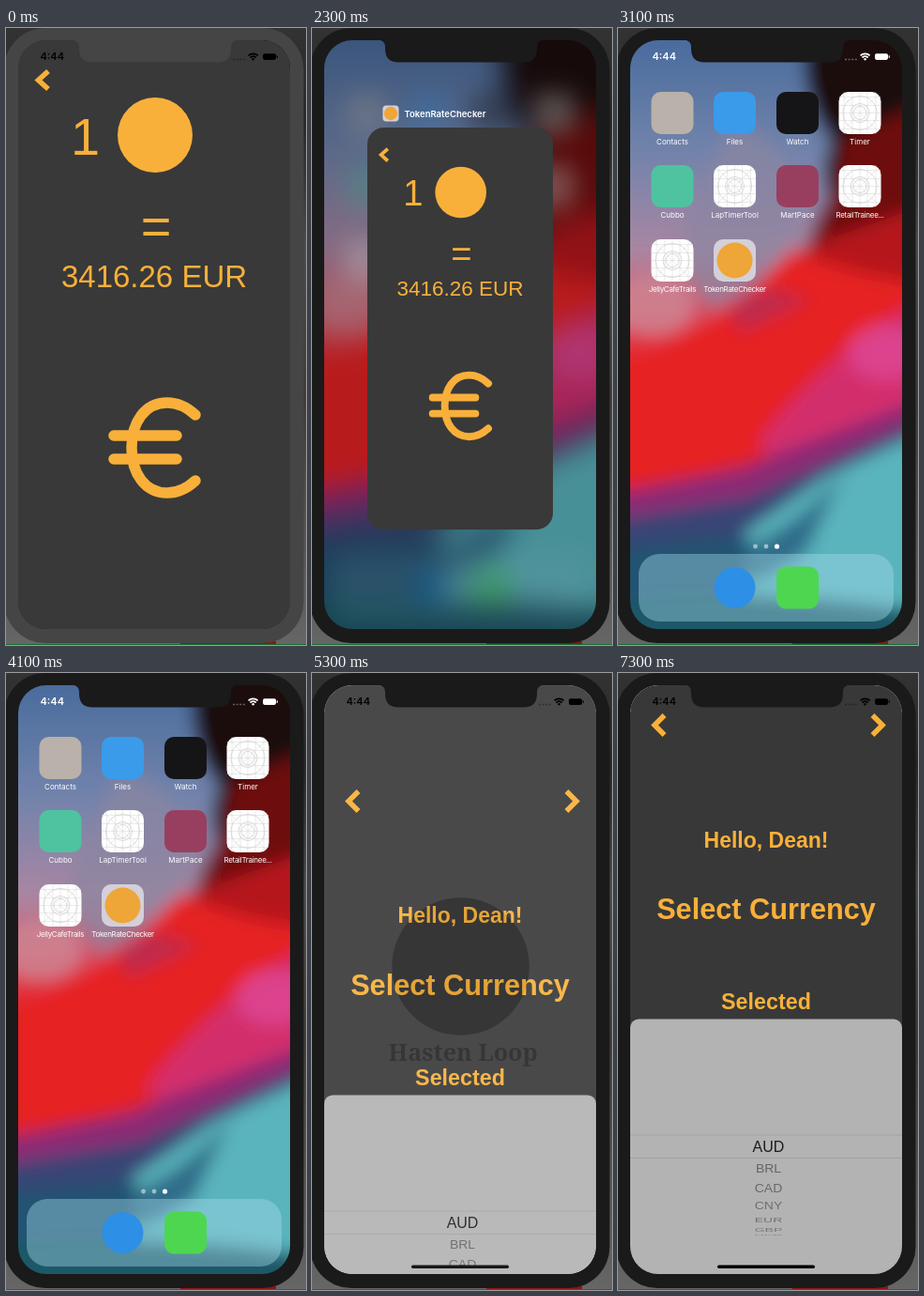
An HTML page that plays this animation: 320 by 657 pixels, repeating every 8 s.

```html
<!DOCTYPE html>
<html lang="en">
<meta charset="utf-8">
<title>Phone app switching</title>
<style>
  html, body { margin: 0; width: 100%; height: 100%; overflow: hidden; background: #222; }
  svg { display: block; width: 320px; height: 657px; }
  text { font-family: "Liberation Sans", Arial, sans-serif; }
  .ui { font-family: Inter, Roboto, sans-serif; }
  .mid { text-anchor: middle; }
  .gold { fill: #f8b03a; }
  .line { fill: none; stroke: #f8b03a; }
  .bold { font-weight: bold; }
</style>
<svg viewBox="0 0 320 657">
  <defs>
    <linearGradient id="desk" x2="0" y2="1">
      <stop stop-color="#333"/><stop offset=".15" stop-color="#262626"/>
      <stop offset=".35" stop-color="#4a4a4a"/><stop offset=".6" stop-color="#403a3a"/>
      <stop offset="1" stop-color="#666"/>
    </linearGradient>
    <linearGradient id="sky" x2="0" y2="1">
      <stop stop-color="#3b6398"/><stop offset=".22" stop-color="#7183ab"/>
      <stop offset=".37" stop-color="#ab86a2"/><stop offset=".46" stop-color="#d8485c"/>
      <stop offset=".54" stop-color="#e81f24"/><stop offset=".72" stop-color="#d01528"/>
      <stop offset=".8" stop-color="#5a2360"/><stop offset=".87" stop-color="#23486a"/>
      <stop offset="1" stop-color="#1f5568"/>
    </linearGradient>
    <filter id="soft" x="-20%" y="-20%" width="140%" height="140%"><feGaussianBlur stdDeviation="9"/></filter>
    <clipPath id="screen"><rect x="13" y="13" width="290" height="627" rx="30"/></clipPath>
    <clipPath id="appClip"><rect id="appBox"/></clipPath>
    <clipPath id="launchClip"><rect id="launchBox"/></clipPath>
    <g id="status" fill="currentColor">
      <text class="ui" x="36.5" y="34.2" font-size="11" font-weight="600">4:44</text>
      <path d="M258.6 29.4a7 7 0 0 1 10 0M260.5 31.5a4.4 4.4 0 0 1 6.2 0" fill="none" stroke="currentColor" stroke-width="1.8"/>
      <circle cx="263.6" cy="33.2" r="1.2"/>
      <rect x="274" y="27.3" width="14" height="6.6" rx="1.8"/>
      <rect x="288.7" y="29.3" width="1.1" height="2.6"/>
      <path d="M242 33.5h13" stroke="currentColor" stroke-width="1.6" stroke-dasharray="2 1.6" opacity=".35"/>
    </g>
    <g id="blank">
      <rect x="-22.5" y="-22.5" width="45" height="45" rx="10" fill="#fff"/>
      <path d="M-22 0H22M0-22V22M-17-22V22M17-22V22M-22-17H22M-22 17H22M-8-22V22M8-22V22M-22-8H22M-22 8H22M-19-19 19 19M19-19-19 19" stroke="#dcdcdc" stroke-width=".6"/>
      <g fill="none" stroke="#ccc" stroke-width=".7"><circle r="18"/><circle r="10"/><circle r="7"/></g>
    </g>
    <g id="coin">
      <rect x="-22.5" y="-22.5" width="45" height="45" rx="10" fill="#d3d0da"/>
      <circle r="19" fill="#efa638"/>
    </g>
  </defs>

  <rect width="320" height="657" fill="url(#desk)"/>
  <path d="M186 654.5H288" stroke="#8a1616" stroke-width="3"/>
  <path d="M0 656.5H320" stroke="#17702c"/>
  <rect id="bezel" x="-2" width="319.5" height="655" rx="44"/>

  <g clip-path="url(#screen)">
    <g id="home">
      <g filter="url(#soft)">
        <rect x="-40" y="-30" width="400" height="730" fill="url(#sky)"/>
        <path d="M120 100Q190 120 200 200Q160 270 100 300L60 240Z" fill="#8a86a2" opacity=".7"/>
        <path d="M205-30H350V140L235 200Q210 160 228 120Q185 70 205-30" fill="#1c080e"/>
        <path d="M238 120L350 70V270L195 270Q200 215 232 170Z" fill="#6e0b10"/>
        <path d="M195 235L350 180V330L150 330Z" fill="#b5121c"/>
        <path d="M-20 365Q110 325 185 235Q250 265 350 275V430L-20 500Z" fill="#e62024"/>
        <path d="M120 300Q140 265 205 290L130 325Z" fill="#b0305c" opacity=".7"/>
        <path d="M150 440Q230 335 350 275V410L170 470Z" fill="#d0307a" opacity=".85"/>
        <ellipse cx="285" cy="345" rx="40" ry="30" fill="#e04c9c" opacity=".7"/>
        <ellipse cx="36" cy="295" rx="45" ry="32" fill="#cf8795" opacity=".8"/>
        <path d="M-30 500L130 468L350 385V422L120 515L-30 535Z" fill="#8c2a74"/>
        <path d="M-30 528L140 500L350 405V440L150 540L-30 575Z" fill="#384474"/>
        <path d="M80 575L220 478L350 418V700H150Z" fill="#5ab4bd"/>
        <path d="M100 570Q190 535 240 475L200 560L150 590Z" fill="#2f6c88"/>
        <path d="M-30 555L140 540L130 700H-30Z" fill="#225272"/>
        <path d="M-30 612Q160 590 350 625V700H-30Z" fill="#1f5868"/>
      </g>
      <g id="items">
        <rect x="22" y="560" width="272" height="72" rx="22" fill="#a8dcea" opacity=".4"/>
        <g fill="#fff"><circle cx="146.5" cy="552" r="2.4" opacity=".5"/><circle cx="158" cy="552" r="2.4" opacity=".5"/><circle cx="169.5" cy="552" r="2.6"/></g>
        <g id="icons"></g>
      </g>
      <use id="homeStatus" href="#status" color="#fff"/>
    </g>

    <g id="label">
      <use href="#coin" transform="translate(84 91) scale(.38)"/>
      <text class="ui" x="98.5" y="94.5" font-size="9.5" font-weight="600" fill="#fff">TokenRateChecker</text>
    </g>

    <g id="app" clip-path="url(#appClip)">
      <rect x="13" y="13" width="290" height="627" fill="#393939"/>
      <use id="appStatus" href="#status" color="#000"/>
      <path class="line" d="M45 46L34.5 55.5L45 65" stroke-width="5.5"/>
      <g class="gold">
        <text x="69" y="135" font-size="56">1</text>
        <circle cx="159" cy="114" r="40"/>
        <text class="mid" x="160" y="230" font-size="56">=</text>
        <text class="mid" x="158" y="275.5" font-size="33">3416.26 EUR</text>
      </g>
      <path class="line" stroke-width="11.5" stroke-linecap="round" d="M202 412Q188 399 172 399C148 399 134 420 134 447S148 495 172 495Q188 495 202 482M115 434H182M115 459H182"/>
      <rect id="bar" x="106" y="630.5" width="104" height="3.5" rx="1.7" fill="#4c4c4c"/>
    </g>

    <g id="launch" clip-path="url(#launchClip)">
      <rect x="13" y="13" width="290" height="627" fill="#fff"/>
      <g transform="translate(-5.85 -20.5) scale(1.047)" fill="#343434">
        <circle cx="157" cy="318" r="70"/>
        <text class="mid bold" x="159.5" y="414" font-size="24" style="font-family:'Noto Serif',serif">Hasten Loop</text>
      </g>
      <g id="select">
        <rect x="13" y="13" width="290" height="627" fill="#383838"/>
        <g id="slide">
          <path class="line" d="M49.5 45L39 55.5L49.5 66M271.5 45L282 55.5L271.5 66" stroke-width="5.5"/>
          <g class="gold mid bold">
            <text x="158" y="185.5" font-size="23">Hello, Dean!</text>
            <text x="158" y="262" font-size="30.7">Select Currency</text>
            <text x="158" y="358" font-size="23.3">Selected</text>
          </g>
          <rect x="13" y="368.5" width="290" height="290" rx="9" fill="#b3b3b3"/>
          <path d="M13 492H303M13 516.5H303" stroke="#a2a2a2"/>
          <g id="wheel" class="mid"></g>
        </g>
        <rect x="106" y="630.5" width="104" height="3.5" rx="1.7"/>
      </g>
      <use href="#status" color="#000"/>
    </g>
  </g>
  <path id="notch" d="M70 12.5Q78 13 78 20V22Q78 36.5 92 36.5H226Q240 36.5 240 22V20Q240 13 248 12.5Z"/>
</svg>
<script>
const $ = id => document.getElementById(id);
const clamp = v => Math.max(0, Math.min(1, v));
const mix = (a, b, p) => a + (b - a) * p;
const ramp = (t, from, to) => clamp((t - from) / (to - from));
const smooth = p => p * p * (3 - 2 * p);

// Piecewise linear track of [time, value] pairs
function track(t, keys) {
  let [t0, v0] = keys[0];
  for (const [t1, v1] of keys) {
    if (t < t1) return t1 > t0 ? mix(v0, v1, clamp((t - t0) / (t1 - t0))) : v0;
    [t0, v0] = [t1, v1];
  }
  return v0;
}

const tile = (x, y, fill) =>
  `<rect x="${x - 22.5}" y="${y - 22.5}" width="45" height="45" rx="10" fill="${fill}"/>`;
const stamp = (x, y, id) => `<use href="#${id}" transform="translate(${x} ${y})"/>`;
const cols = [58, 124.5, 191.5, 258], rows = [90.5, 168.5, 247.5];
const apps = [
  ["Contacts", "#b9b1aa"], ["Files", "#3a9bea"], ["Watch", "#151517"], ["Timer", "blank"],
  ["Cubbo", "#4fc3a0"], ["LapTimerTool", "blank"], ["MartPace", "#983f60"], ["RetailTrainee...", "blank"],
  ["JellyCafeTrails", "blank"], ["TokenRateChecker", "coin"]
];
// Long names are set tighter
$("icons").innerHTML = apps.map(([name, look], i) => {
  const x = cols[i % 4], y = rows[i >> 2], gap = name.length > 14 ? -.3 : 0;
  return (look[0] === "#" ? tile(x, y, look) : stamp(x, y, look)) +
    `<text class="ui mid" x="${x}" y="${y + 33}" font-size="8" letter-spacing="${gap}" fill="#fff">${name}</text>`;
}).join("") + `<circle cx="124.5" cy="596" r="22" fill="#2d8fe6"/>` + tile(191.5, 596, "#4ed651");

$("wheel").innerHTML = ["AUD", "BRL", "CAD", "CNY", "EUR", "GBP", "HKD"].map((code, i) => {
  const a = i * .24, size = i ? 14 : 16;
  return `<text transform="translate(160.5 ${504.5 + 95 * Math.sin(a)}) scale(1 ${Math.cos(a)})" y="${size * .36}"
    font-size="${size}" fill="#1c1c1c" opacity="${i ? .55 - i * .03 : 1}">${code}</text>`;
}).join("");

// Fits a full-screen view into a card centred at cx, cropping its height to h
function place(id, cx, top, w, h, r) {
  const s = w / 290, box = $(id + "Box");
  $(id).setAttribute("transform", `translate(${cx - w / 2} ${top}) scale(${s}) translate(-13 -13)`);
  for (const [k, v] of Object.entries({ x: 13, y: 13, width: 290, height: h / s, rx: r / s }))
    box.setAttribute(k, v);
}
const fade = (id, v) => { $(id).style.opacity = v; $(id).style.display = v > 0 ? "" : "none"; };

function draw(t) {
  const awake = ramp(t, 0, 350), shade = Math.round(mix(69, 26, awake));
  for (const id of ["bezel", "notch"]) $(id).setAttribute("fill", `rgb(${shade},${shade},${shade})`);

  // Card shrinks into the switcher, then into its icon
  const leave = smooth(ramp(t, 2500, 2950));
  const s = track(t, [[300, 1], [1200, .84], [1700, .7], [2000, .683]]);
  const top = track(t, [[300, 13], [1200, 42], [1700, 98], [2000, 106]]);
  const cx = track(t, [[300, 158], [1200, 163], [1900, 158]]);
  place("app", mix(cx, 124.5, leave), mix(top, 225, leave),
    mix(290 * s, 45, leave), mix(627 * s, 45, leave), mix(track(t, [[300, 28], [1200, 20], [2000, 18]]), 10, leave));
  fade("app", 1 - leave * leave);
  fade("appStatus", 1 - ramp(t, 700, 1700));
  fade("bar", awake * (1 - ramp(t, 1200, 1900)));
  fade("label", ramp(t, 1700, 1950) * (1 - ramp(t, 2500, 2650)));
  fade("homeStatus", leave);

  // Launch springs out of the icon
  const k = Math.max(0, t - 4300) * .0117, p = 1 - (1 + k) * Math.exp(-k);
  const h = mix(45, 627, p ** 1.55);
  place("launch", mix(191.5, 158, p ** .1), mix(168.5, 326.5, p ** .5) - h / 2, mix(45, 290, p), h, mix(10, 29, p));
  fade("launch", clamp(p * 4));

  // The home screen is blurred, dimmed and emptied while it lies behind a card
  const depth = t < 4300 ? 1 - leave : p;
  const light = t < 4300 ? mix(track(t, [[300, .5], [1200, .65], [1900, .8]]), 1, leave) : 1 - .7 * p;
  $("home").style.filter = depth > .005 ? `blur(${12 * depth}px) brightness(${light})` : "none";
  $("items").style.opacity = 1 - .65 * depth;

  fade("select", ramp(t, 4900, 5340));
  $("slide").setAttribute("transform", `translate(0 ${627 * Math.exp(-.0068 * Math.max(0, t - 5000))})`);
}

function tick() {
  draw(performance.now() % 8000);
  requestAnimationFrame(tick);
}
tick();
</script>
</html>
```
